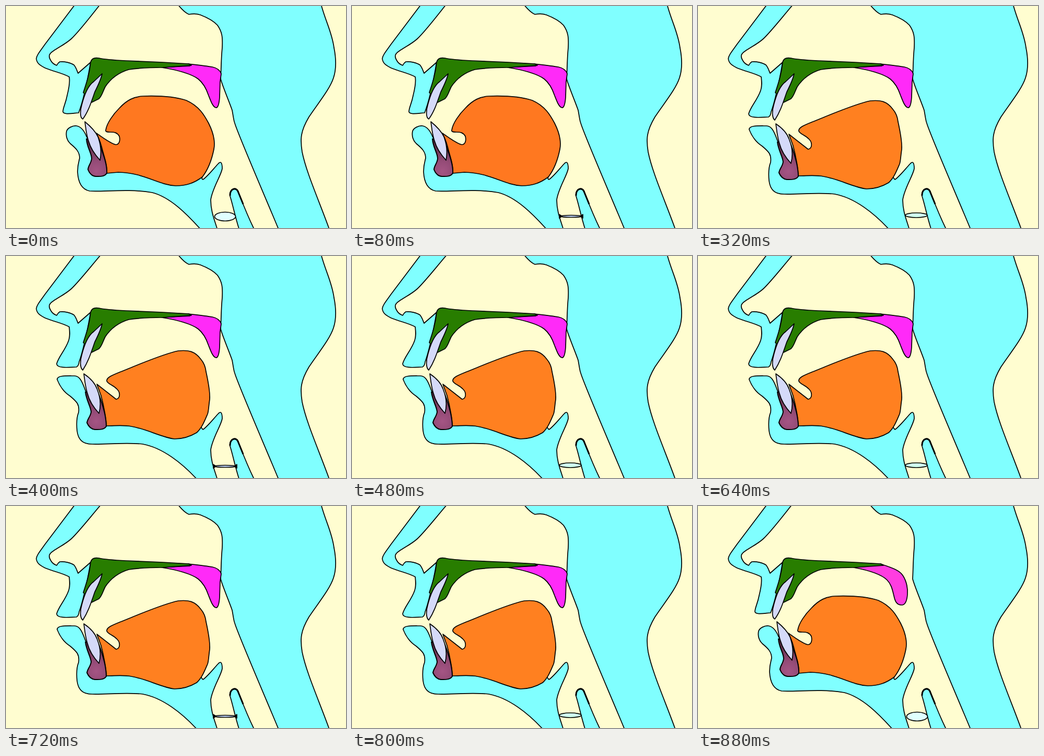
An HTML page that plays this animation: 651x426 px, repeating every 1040 ms.

```html
<!DOCTYPE html>
<html lang="en">
<head>
<meta charset="utf-8">
<title>Articulation cross-section</title>
<style>
  html, body { margin: 0; height: 100%; overflow: hidden; background: #fffdd0; }
  svg { display: block; width: 100vw; height: 100vh; }
  path, ellipse { stroke: #000; stroke-width: 1.7; stroke-linejoin: round; }
  .skin { fill: #80ffff; }
  .tooth { fill: #d5daf9; }
  .gum { fill: url(#gum); stroke-width: 2; }
  .palate { fill: #287d00; }
</style>
</head>
<body>
<svg viewBox="0 0 651 426">
  <defs>
    <radialGradient id="gum" gradientUnits="userSpaceOnUse" cx="173" cy="317" r="58">
      <stop offset="0" stop-color="#a55584"/>
      <stop offset=".35" stop-color="#934b76"/>
      <stop offset="1" stop-color="#4c273d"/>
    </radialGradient>
  </defs>

  <!-- pharynx wall and larynx -->
  <path class="skin" d="M328-4C336 6 343 13 350 16C356 15 364 14 372 17C385 22 397 28 405 37C414 50 415 60 414 80C412 100 412 120 411 140C415 155 428 185 433 200C436 215 435 218 439 228C450 260 500 375 523 431H620C600 375 575 320 567 280C563 255 564 240 580 213C595 190 620 160 627 138C633 120 632 100 628 80C624 50 612 30 603-4Z"/>
  <path class="skin" d="M476 430C462 402 453 378 446 360C444 352 441 350 436 351C430 353 428 358 429 365C434 380 440 410 447 430Z"/>
  <path fill="none" style="stroke-width:3" d="M429 364C428 350 442 346 445 358L454 380"/>

  <path class="skin" id="nose"/>
  <path id="velum"/>
  <path class="palate" d="M162 108C164 100 170 99 178 100C190 103 210 104 230 105L300 108 350 111 355 114 300 118C280 118 260 118 235 122C215 128 200 140 190 155C185 165 184 172 178 178L164 185 148 166C154 148 160 130 162 108Z"/>
  <path class="tooth" id="upperTooth"/>
  <path class="skin" id="jaw"/>
  <path id="tongue"/>
  <path class="gum" id="gumShape"/>
  <path class="tooth" id="lowerTooth"/>
  <ellipse id="glottis"/>
  <path id="folds" d="M397 400L402 403.500 397 407ZM442 400L437 403.500 442 407Z"/>
</svg>
<script>
const el = id => document.getElementById(id);
const set = (id, attrs) => {
  for (const key in attrs) el(id).setAttribute(key, attrs[key]);
};

const nasalEdge = 'C145 190 154 155 162 108L138 129C136 125 135 119 130 113C124 109 112 106 103 107C100 109 98 112 97 114C92 112 88 109 86 105C80 96 83 91 91 86C101 79 114 73 125 63C139 50 160 23 ';
const noseFront = 'M133-4L75 73C65 87 59 94 58 101C59 109 63 113 75 119C92 126 109 129 121 136';
const epiglottis = 'H405C400 412 392 395 392 372C395 350 412 325 414 312C414 300 411 297 406 303C395 315 385 328 377 333';

const spread = {
  nose: noseFront + 'C123 146 120 160 117 172C114 188 109 195 109 203C111 209 126 206 139 205' + nasalEdge + '181-4Z',
  upperTooth: 'M184 130C182 141 175 155 170 165C163 185 158 202 147 217C141 214 142 200 145 190C150 170 158 152 168 145Z',
  jaw: 'M116 240C114 250 116 257 123 264C134 273 141 280 141 292C139 300 137 305 137 318C138 338 145 352 160 355C185 357 235 350 280 358C315 367 347 400 374 430' + epiglottis + 'Q374 332 376 327L300 300 193 310 170 300 165 270 154 250C149 238 142 231 135 230C128 229 118 234 116 240Z',
  tongue: 'M191 238C193 225 205 208 217 196C232 180 245 174 262 173C290 172 320 173 345 181C370 192 380 210 388 225C398 245 401 260 398 275C394 295 386 315 376 328C360 340 345 345 325 345C290 343 265 320 215 319L193 321C194 305 188 290 183 270C180 258 176 250 173 244C185 252 200 264 210 266C217 266 219 258 217 250C213 243 208 242 200 242C193 242 190 241 191 238Z',
  gumShape: 'M154 255C155 272 164 282 164 293C163 302 157 307 157 314C160 322 166 327 172 327C180 327 188 328 193 321C194 305 187 286 179 264Z',
  lowerTooth: 'M151 222C162 231 171 240 176 251C182 267 183 281 180 296C170 285 162 273 158 259C154 248 153 236 151 222Z'
};

const narrow = {
  nose: noseFront + 'C122 145 123 153 120 162C114 180 100 194 97 207C98 217 125 213 135 213Q139 211 140 203' + nasalEdge + '183-4Z',
  upperTooth: spread.upperTooth.replace('147 217', '147 219'),
  jaw: 'M98 237C103 250 112 262 123 269C136 280 141 285 139 300C135 310 135 325 136 335C138 352 146 361 165 361C190 362 230 357 262 361C300 368 338 398 367 430' + epiglottis + 'L373 328 300 300 193 316 170 306 165 276 152 258C145 238 140 230 131 230C114 230 98 229 98 237Z',
  tongue: 'M193 240C192 233 203 229 220 222C250 210 300 188 330 182C350 180 362 183 373 198C380 206 382 213 383 222C388 245 391 262 390 275C388 288 388 298 386 303C380 317 375 330 365 339C350 348 335 351 323 351C300 349 270 332 240 327C225 324 210 326 192 326C192 315 188 290 182 268L174 246 211 275C219 273 219 262 213 256C205 247 195 246 193 240Z',
  gumShape: 'M152 261C154 278 162 288 163 299C162 308 156 312 155 320C158 327 163 332 170 333C178 333 187 334 192 327C192 311 187 290 178 266Z',
  lowerTooth: 'M149 226C161 234 171 244 175 257C181 272 182 287 178 302C168 291 160 280 156 264C152 252 151 240 149 226Z'
};

const velum = {
  raised: 'M298 118L352 115 348 111C365 113 383 115 395 117Q409 120 412 130L410 145 409 175C408 190 405 196 402 195C396 194 392 182 388 172C384 160 378 148 368 140C355 130 325 122 298 118Z',
  lowered: 'M298 118L350 111C362 116 384 121 392 133C400 145 402 160 401 170C400 182 397 190 390 190C380 190 377 182 375 172C372 160 370 150 362 142C350 130 325 123 298 118Z'
};

const glottis = {
  open: { cx: 419.5, cy: 404, rx: 20, ry: 8.5, fill: '#e0ffff' },
  part: { cx: 418, cy: 401.5, rx: 21, ry: 4.5, fill: '#d0fff0' },
  shut: { cx: 419.5, cy: 403.5, rx: 20, ry: 2, fill: '#c8dcff' }
};

function draw(now) {
  const t = now % 1040;
  const vowel = t >= 320 && t < 880;
  const nasal = t >= 880;
  const buzz = Math.floor((t - 320) / 80) % 2 === 0;
  const voice = vowel ? (buzz ? 'part' : 'shut') : t >= 80 && !nasal ? 'shut' : 'open';

  const pose = vowel ? narrow : spread;
  for (const id in pose) set(id, { d: pose[id] });
  set('tongue', { fill: t < 320 ? '#ff7820' : '#ff8020' });
  set('velum', {
    d: nasal ? velum.lowered : velum.raised,
    fill: nasal ? '#ff3de0' : '#ff2af8'
  });
  set('glottis', glottis[voice]);
  set('folds', { visibility: voice === 'shut' ? 'visible' : 'hidden' });
  requestAnimationFrame(draw);
}
draw(0);
</script>
</body>
</html>
```
